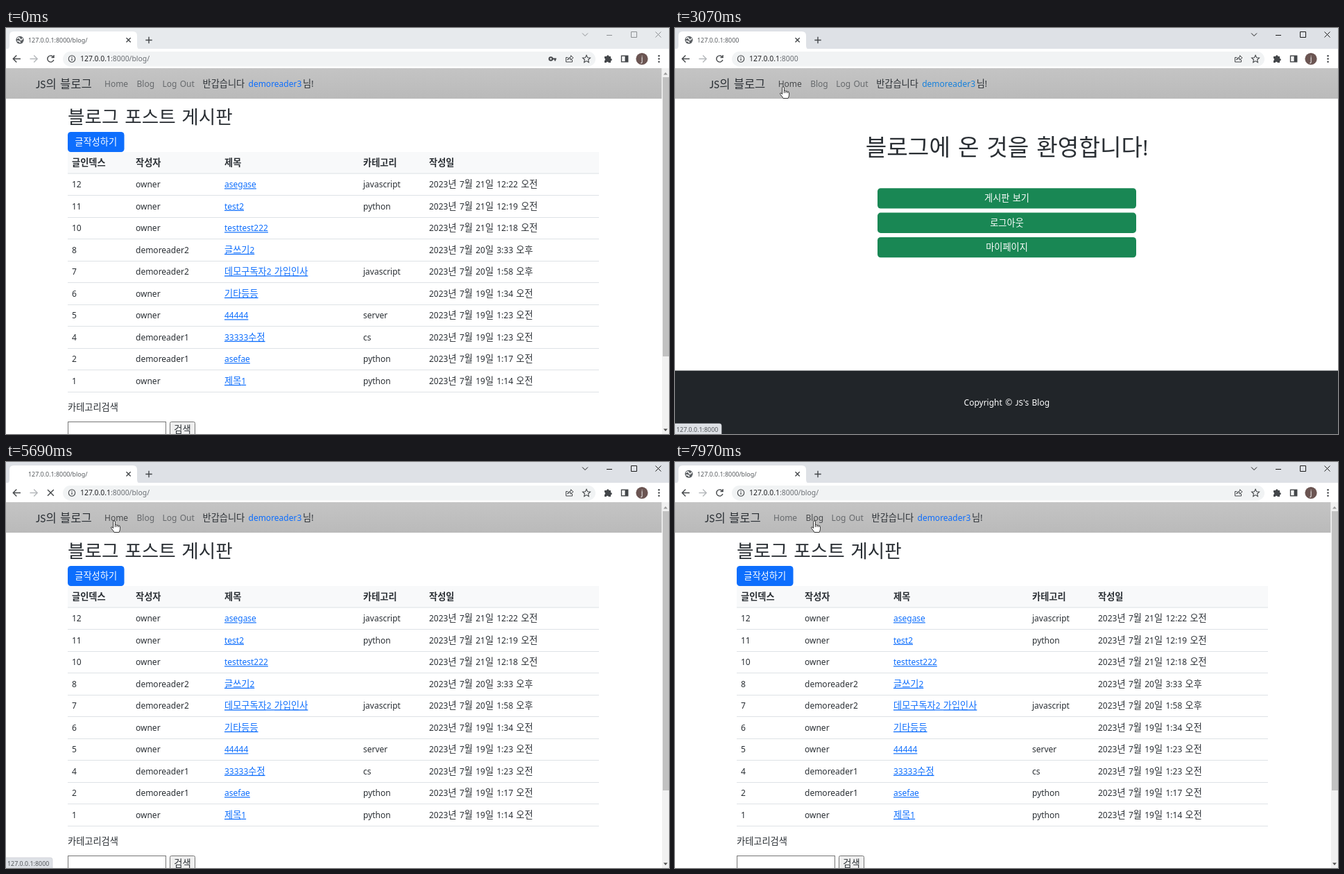
Recreate the animation shown at these times as an HTML page. Size 956 by 586 pixels, loop 8 s.

```html
<!DOCTYPE html>
<html lang="ko">
<head>
<meta charset="utf-8">
<title>블로그</title>
<style>
html, body { margin: 0; height: 100%; overflow: hidden; background: #fff; }
svg { display: block; width: 956px; height: 586px; font: 12px "Noto Sans", "Noto Sans CJK KR", sans-serif; }
text { fill: #2a2f34; word-spacing: .1em; white-space: pre; }
.k { font-family: "Noto Sans CJK KR", "Noto Sans CJK JP", sans-serif; font-size: 1.1em; font-weight: 300; }
.brand { font: 15px Lato, "Noto Sans CJK KR", sans-serif; }
.link { fill: #0d6efd; text-decoration: underline 1px; text-underline-offset: 1px; }
.bold, .bold .k { font-weight: 700; }
.mid { text-anchor: middle; }
.white { fill: #fff; }
.nav { fill: #66696c; }
.nav.on { fill: #484a4c; }
.small { font-size: 8.9px; fill: #55595d; }
.url { font-size: 10.4px; fill: #6a6e73; }
.line { fill: none; stroke: #44474a; stroke-width: 1.4; }
.btn { fill: #198754; }
.btn.on { fill: #157347; }
#controls { fill: none; stroke: #1c1c1c; stroke-width: 1; }
#controls.idle { stroke: #8d9093; }
</style>
</head>
<body>
<svg id="stage" viewBox="0 0 956 586"></svg>
<script>
const LOOP = 8000;
const ADDRESS = '127.0.0.1:8000';

const text = (x, y, s, attrs = '') =>
  `<text x="${x}" y="${y}" ${attrs}>${s.replace(/[가-힣]+/g, '<tspan class="k">$&</tspan>')}</text>`;
const rect = (x, y, w, h, fill, attrs = '') =>
  `<rect x="${x}" y="${y}" width="${w}" height="${h}" fill="${fill}" ${attrs}/>`;
const path = (d, attrs = 'class="line"') => `<path d="${d}" ${attrs}/>`;

const posts = [
  ['12', 'owner', 'asegase', 'javascript', '21일 12:22 오전'],
  ['11', 'owner', 'test2', 'python', '21일 12:19 오전'],
  ['10', 'owner', 'testtest222', '', '21일 12:18 오전'],
  ['8', 'demoreader2', '글쓰기2', '', '20일 3:33 오후'],
  ['7', 'demoreader2', '데모구독자2 가입인사', 'javascript', '20일 1:58 오후'],
  ['6', 'owner', '기타등등', '', '19일 1:34 오전'],
  ['5', 'owner', '44444', 'server', '19일 1:23 오전'],
  ['4', 'demoreader1', '33333수정', 'cs', '19일 1:23 오전'],
  ['2', 'demoreader1', 'asefae', 'python', '19일 1:17 오전'],
  ['1', 'owner', '제목1', 'python', '19일 1:14 오전'],
];
const columns = [95, 187, 315, 515, 610];

function navbar(dx, width, linkColor) {
  return rect(0, 58, width, 44, 'url(#bar)') + `<g transform="translate(${dx} 0)">` +
    text(43, 86.5, 'JS의 블로그', 'class="brand"') +
    text(142, 85.3, 'Home', 'class="nav home"') +
    text(188.5, 85.3, 'Blog', 'class="nav blog"') +
    text(225.5, 85.3, 'Log Out', 'class="nav"') +
    text(283.5, 85.3, '반갑습니다') +
    text(349.5, 85.3, 'demoreader3', `style="fill:${linkColor}"`) +
    text(428, 85.3, '님!') + '</g>';
}

function tableRow([id, author, title, category, date], i) {
  const y = 230.3 + 31.5 * i;
  const cells = [id, author, title, category, '2023년 7월 ' + date];
  return cells.map((s, c) => text(columns[c], y, s, c === 2 ? 'class="link"' : '')).join('') +
    rect(89, Math.round(241 + 31.5 * i), 766, 1, '#dee2e6');
}

function blogPage() {
  const heads = ['글인덱스', '작성자', '제목', '카테고리', '작성일'];
  return navbar(0, 945.5, '#0d6efd') +
    text(89, 138.3, '블로그 포스트 게시판', 'font-size="24.2"') +
    rect(89, 150, 81.5, 29, '#0d6efd', 'rx="4.5"') +
    text(129.7, 169.2, '글작성하기', 'class="mid white"') +
    rect(89, 179, 766, 31, '#f8f9fa') + rect(89, 209.5, 766, 1, '#dee2e6') +
    heads.map((s, c) => text(columns[c], 199, s, 'class="bold"')).join('') +
    posts.map(tableRow).join('') +
    text(89, 551.5, '카테고리검색') +
    rect(89.5, 568.5, 141, 24, '#fff', 'stroke="#767676"') +
    rect(236.5, 568.5, 36, 24, '#efefef', 'stroke="#767676" rx="2"') +
    text(254.5, 584.3, '검색', 'class="mid"') +
    rect(946, 58, 10, 528, '#f1f1f1') + rect(947, 71, 9, 403, '#c1c1c1') +
    path('M948 67.5l3-3.5 3 3.5z', 'fill="#9a9a9a"') +
    path('M948 578.5l3 3.5 3-3.5z', 'fill="#505050"');
}

function homePage() {
  return navbar(6.7, 956, '#1580dc') +
    text(478.5, 184, '블로그에 온 것을 환영합니다!', 'class="mid" font-size="30.2"') +
    ['게시판 보기', '로그아웃', '마이페이지'].map((s, i) =>
      rect(292, 231.2 + 35.4 * i, 373, 29.3, '', 'rx="4.5" class="btn"') +
      text(478.5, 250.4 + 35.4 * i, s, 'class="mid white"')).join('') +
    rect(0, 494.5, 956, 92, '#212529') +
    text(478.3, 545.3, 'Copyright © <tspan font-family="Lato, sans-serif">JS</tspan>\'s Blog', 'class="mid white"');
}

function browser() {
  return rect(0, 0, 956, 31, '#dee1e6', 'id="title"') +
    path('M0 31Q5 31 5 25V11Q5 5 11 5H183Q189 5 189 11V25Q189 31 194 31z', 'fill="#fff"') +
    rect(0, 30, 956, 28, '#fff') +
    '<g id="globe"><circle cx="20" cy="17.3" r="5.6" fill="#5b5f63"/>' +
    path('M16 15.5q3-3 4 0t3 1l1-2M16 18.5l4 1v2', 'fill="none" stroke="#fff" stroke-width="1.5"') + '</g>' +
    text(32, 20.6, '', 'class="small" id="tab"') +
    path('M173.5 14.2l6.2 6.2m0-6.2l-6.2 6.2') +
    path('M201.3 17.5h9.4M206 12.8v9.4') +
    '<g id="controls">' + path('M831 7.5l4 4 4-4M866 10.5h8M901.5 5.5h8v8h-8zM936.5 5.5l8 8m0-8l-8 8', '') + '</g>' +
    path('M21 44.5H10.5M15.3 39.5l-5 5 5 5') +
    path('M34.5 44.5H45M40.2 39.5l5 5-5 5', 'class="line" style="stroke:#b5b8bb"') +
    path('M68.3 42A4.6 4.6 0 1 0 68.8 46M69 39v3.6h-3.6', 'class="line" id="reload"') +
    path('M60 40l8.8 8.8m0-8.8L60 48.8', 'class="line" id="stop"') +
    rect(82, 34, 768, 21.5, '#f1f3f4', 'rx="10.7"') +
    '<circle class="line" cx="95" cy="44.5" r="4.7" style="stroke-width:1.1"/>' +
    path('M95 43.8v3.2M95 41.6v1.2', 'class="line" style="stroke-width:1.2"') +
    '<text x="107" y="48.2" class="url"><tspan fill="#202124">127.0.0.1</tspan>:8000<tspan id="path"></tspan></text>' +
    '<g id="key"><circle class="line" cx="785.6" cy="44.5" r="2.3" style="stroke-width:2"/>' +
    path('M788 44.5h5.5M791.7 44.5v3', 'class="line" style="stroke-width:2"') + '</g>' +
    path('M810 42.5h-2.5v6.5h9v-3M809.5 46q1-4 5-4v-2.3l3.5 3.3-3.5 3.3V44q-3 0-5 2z', 'class="line" style="stroke-width:1"') +
    path('M837 39.3l1.6 3.5 3.9.4-2.9 2.6.8 3.8-3.4-2-3.4 2 .8-3.8-2.9-2.6 3.9-.4z', 'class="line" style="stroke-width:1.1"') +
    path('M863 41h3a1.8 1.8 0 0 1 3.6 0h2.4v3a1.8 1.8 0 0 1 0 3.6v2.4h-3.2a1.7 1.7 0 0 0-3.2 0H863v-3a1.7 1.7 0 0 0 0-3.2z', 'fill="#44474a"') +
    rect(887.5, 40.2, 9.2, 8.6, 'none', 'class="line"') + rect(892.5, 40, 4.5, 9, '#44474a') +
    '<circle cx="917" cy="44.5" r="8.6" fill="#6b5552"/>' +
    text(917, 48, 'j', 'class="mid white" font-size="10.5"') +
    [40.3, 44.5, 48.7].map(y => `<circle cx="941.5" cy="${y}" r="1.25" fill="#44474a"/>`).join('');
}

const cursors =
  '<g id="arrow">' + path('M0 0v13.6l3.1-3 2.1 5 2.2-1-2-4.8h4.2z', 'fill="#fff" stroke="#222" stroke-width=".9"') + '</g>' +
  '<g id="hand">' + path('M-1.4 1.2a1.4 1.4 0 0 1 2.8 0V6q1.5-1 2.5.4 1.5-.7 2.4.6 2.2-.5 2.2 1.6v3q0 2.2-1.5 4.9H0q-1.8-3.4-4.3-5.9-.7-1.9 1.2-1.7l1.7 1.6zM1.4 6v3M3.9 6.6V9M6.3 7.2V9',
    'fill="#fff" stroke="#222" stroke-width=".9"') + '</g>' +
  '<g id="beam">' + path('M-2.5-6H-.7L0-5.4.7-6H2.5M0-5.4V5.4M-2.5 6H-.7L0 5.4.7 6H2.5', 'fill="none" stroke="#222"') + '</g>';

const stage = document.getElementById('stage');
stage.innerHTML =
  '<defs><linearGradient id="bar" x2="0" y2="1"><stop stop-color="#c4c4c4"/><stop offset="1" stop-color="#bababa"/></linearGradient></defs>' +
  rect(0, 0, 956, 586, '#fff') +
  `<g id="blogPage">${blogPage()}</g><g id="homePage">${homePage()}</g>` +
  rect(327, 112, 1, 33, '#212529', 'id="caret"') + browser() +
  '<g id="status">' + path('', 'id="statusBox" fill="#dee1e6" stroke="#c9ccd1" stroke-width=".6"') +
  text(2, 582.6, '', 'class="small" id="statusText"') + '</g>' +
  `<g id="cursor">${cursors}</g>`;

const $ = id => document.getElementById(id);
const show = (id, on) => { $(id).style.display = on ? '' : 'none'; };
const within = (t, ...spans) => spans.some(([a, b]) => t >= a && t < b);
const mark = (selector, on) =>
  stage.querySelectorAll(selector).forEach(e => e.classList.toggle('on', on));

// time, x, y, shape from this time on
const track = [
  [520, 492, 588, 'arrow'], [760, 482, 440, 'arrow'], [1220, 482, 176, 'arrow'],
  [1290, 480, 176, 'arrow'], [1560, 400, 150, 'beam'], [1830, 329, 130, 'beam'],
  [1930, 230, 105, 'arrow'], [2040, 157, 89, 'arrow'], [2320, 78, 65, 'arrow'],
  [2460, 72, 57, 'arrow'], [2600, 110, 70, 'arrow'], [2740, 150, 83, 'hand'],
  [2850, 156, 85, 'hand'], [3420, 156, 85, 'hand'], [3480, 205, 108, 'arrow'],
  [3600, 340, 175, 'beam'], [3680, 430, 220, 'arrow'], [3740, 480, 268, 'hand'],
  [3840, 531, 279, 'hand'], [3950, 532, 278, 'hand'], [4180, 517, 249, 'hand'],
  [4600, 517, 249, 'hand'], [4670, 480, 232, 'arrow'], [5000, 290, 150, 'arrow'],
  [5240, 165, 92, 'hand'], [5350, 156, 85, 'hand'], [6030, 156, 85, 'hand'],
  [6080, 205, 110, 'arrow'], [6180, 335, 172, 'beam'], [6230, 373, 190, 'beam'],
  [6400, 445, 208, 'arrow'], [6600, 430, 205, 'arrow'], [6790, 388, 194, 'beam'],
  [6860, 388, 194, 'beam'], [7050, 300, 155, 'arrow'], [7400, 208, 80, 'hand'],
  [7480, 202, 78, 'hand'], [7620, 201, 85, 'hand'], [LOOP, 201, 85, 'hand'],
];

function moveCursor(t) {
  const i = track.findIndex(([time]) => time > t);
  show('cursor', i > 0);
  if (i < 1) return;
  const [a, ax, ay, shape] = track[i - 1], [b, bx, by] = track[i];
  const k = (t - a) / (b - a);
  $('cursor').setAttribute('transform', `translate(${ax + (bx - ax) * k} ${ay + (by - ay) * k})`);
  for (const name of ['arrow', 'hand', 'beam']) show(name, name === shape);
}

function draw(now) {
  const t = now % LOOP;
  const home = within(t, [3070, 4390], [5760, 7830]);
  const loading = within(t, [3000, 3070], [4250, 4390], [5630, 5760], [7690, 7830]);
  const idle = t < 460;
  const folder = home ? '' : '/blog/';

  show('homePage', home);
  show('blogPage', !home);
  show('caret', within(t, [1830, 2360]));
  show('key', t < 3000);
  show('globe', !loading);
  show('reload', !loading);
  show('stop', loading);
  $('title').setAttribute('fill', idle ? '#e7eaed' : '#dee1e6');
  $('controls').classList.toggle('idle', idle);
  $('tab').textContent = ADDRESS + folder;
  $('path').textContent = folder;

  const toHome = within(t, [2800, 3520], [5300, 6130]);
  const toBlog = within(t, [4180, 5300], [7690, 7900]);
  const w = toHome ? 67 : 92;
  show('status', toHome || toBlog);
  $('statusBox').setAttribute('d', `M-1 587V571H${w - 3}Q${w} 571 ${w} 574V587z`);
  $('statusText').textContent = ADDRESS + (toHome ? '' : '/blog/');

  mark('.home', within(t, [2740, 3480], [5240, 6080]));
  mark('.blog', t >= 7400);
  const buttons = stage.querySelectorAll('.btn');
  buttons[0].classList.toggle('on', within(t, [4090, 4390]));
  buttons[1].classList.toggle('on', within(t, [3740, 4050]));

  moveCursor(t);
}

const start = performance.now();
function tick() {
  draw(performance.now() - start);
  requestAnimationFrame(tick);
}
tick();
</script>
</body>
</html>
```
